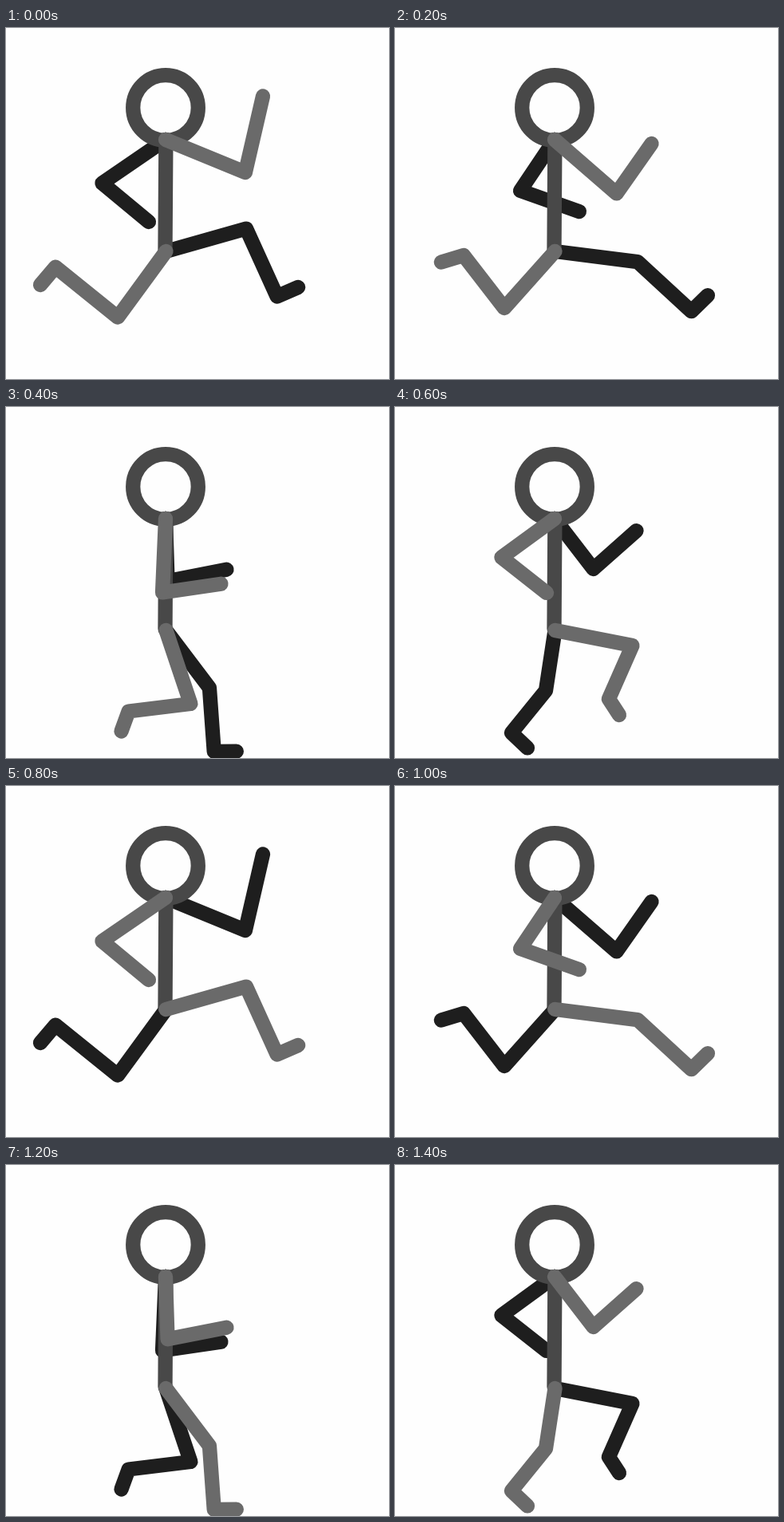
These frames come from a looping animation (480x440 px, 1600 ms). An HTML page:

```html
<!DOCTYPE html>
<html lang="en">
<head>
<meta charset="utf-8">
<title>Running figure</title>
<style>
  html, body { margin: 0; width: 100%; height: 100%; overflow: hidden; background: #fefefe; }
  svg { display: block; width: 480px; height: 440px; }
  path, circle { fill: none; stroke-width: 18.3; stroke-linecap: round; stroke-linejoin: round; }
  .far { stroke: #1e1e1e; }
  .body { stroke: #484848; }
  .near { stroke: #6a6a6a; }
</style>
</head>
<body>
<svg viewBox="0 0 480 440">
  <path id="farArm" class="far"/>
  <path id="farLeg" class="far"/>
  <circle class="body" cx="200" cy="100" r="40.8"/>
  <path class="body" d="M200.4 140L199.5 278"/>
  <path id="nearArm" class="near"/>
  <path id="nearLeg" class="near"/>
</svg>
<script>
const STEP = 200;
const STEPS = 8;

// Key poses of one limb over a full cycle, three per stride.
// Each bone is [length, angle in degrees clockwise from the right].
const ARM = {
  root: [200, 140],
  keys: [
    [[108, 22.3], [98, -77]],
    [[102.8, 41], [76.4, -54.9]],
    [[82.3, 143.9], [71.9, 38.2]],
    [[96.4, 145.6], [76, 39.7]],
    [[77.1, 123.9], [78.4, 19.4]],
    [[79.5, 52.4], [72.2, -41.6]]
  ]
};
const LEG = {
  root: [200.5, 280],
  keys: [
    [[102.3, 126.2], [100.3, 218.9], [29.4, 130.2]],
    [[95.3, 131.8], [83.4, 232.3], [29.3, 163.1]],
    [[98.8, 11.1], [73.2, 113.8], [23.9, 57]],
    [[104.5, -15.8], [93.3, 65.6], [28.9, -23.5]],
    [[104.3, 7.2], [91.7, 42.6], [28.6, -44.3]],
    [[76.4, 98.7], [68.2, 129.1], [27.6, 43.5]]
  ]
};

const mix = (a, b, t) => a + (b - a) * t;

// Four steps per stride; the third swings halfway between its neighbours.
function bonesAt(keys, step) {
  const beat = step % 4;
  const at = 3 * Math.floor(step / 4) + (beat < 2 ? beat : (beat + 1) / 2);
  const from = keys[Math.floor(at)], to = keys[Math.ceil(at)];
  return from.map((bone, i) => bone.map((v, j) => mix(v, to[i][j], at % 1)));
}

function limbPath({ root, keys }, step) {
  let [x, y] = root;
  let d = `M${x} ${y}`;
  for (const [length, angle] of bonesAt(keys, step)) {
    const a = angle * Math.PI / 180;
    x += length * Math.cos(a);
    y += length * Math.sin(a);
    d += `L${x.toFixed(2)} ${y.toFixed(2)}`;
  }
  return d;
}

function setLimb(id, limb, step) {
  document.getElementById(id).setAttribute("d", limbPath(limb, step));
}

function draw(time) {
  const near = Math.floor(time / STEP) % STEPS;
  const far = (near + STEPS / 2) % STEPS;
  setLimb("nearArm", ARM, near);
  setLimb("nearLeg", LEG, near);
  setLimb("farArm", ARM, far);
  setLimb("farLeg", LEG, far);
}

const start = performance.now();
function tick() {
  draw(performance.now() - start);
  requestAnimationFrame(tick);
}
tick();
</script>
</body>
</html>
```
